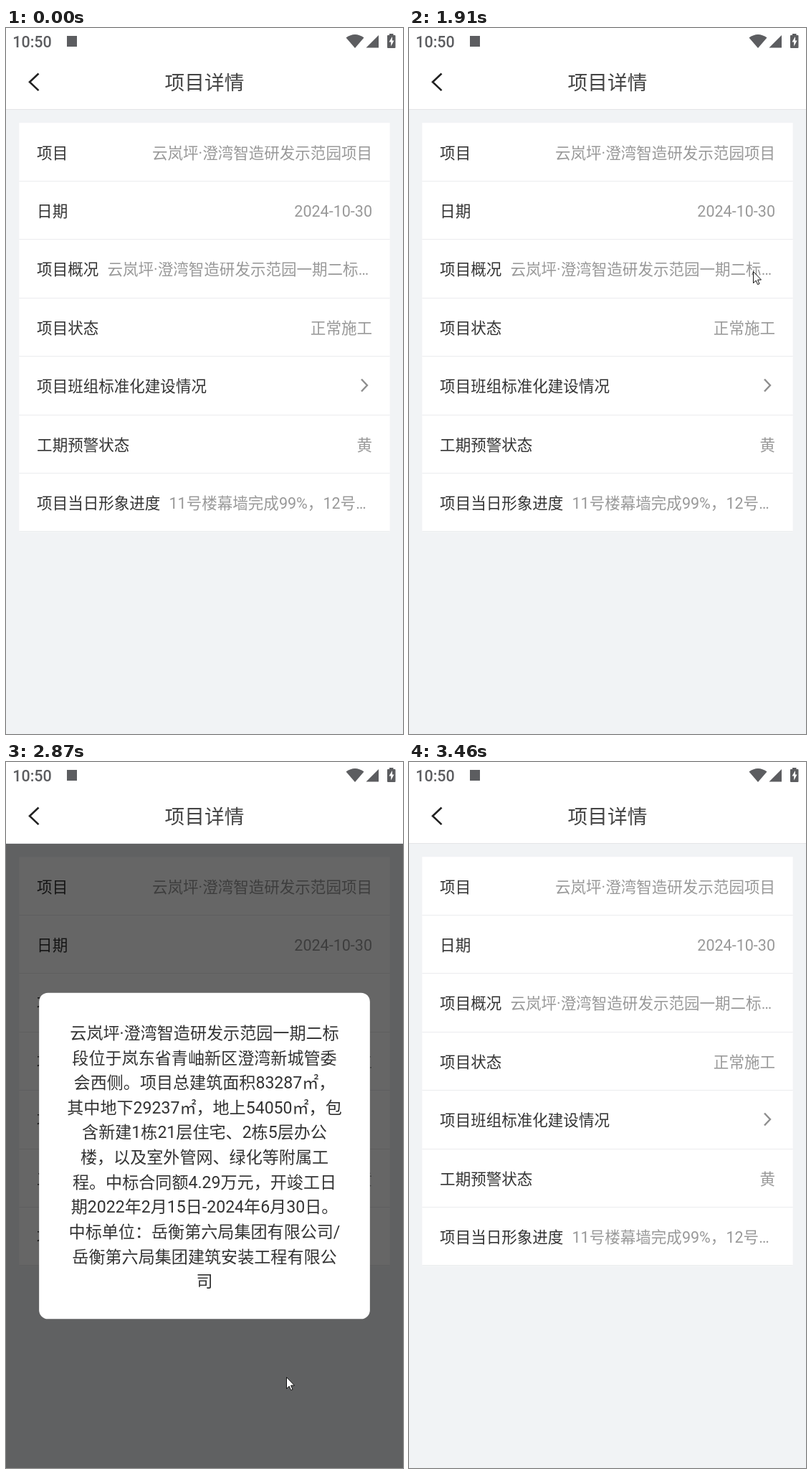
Write an HTML page that moves like this. It is 554 by 984 pixels and loops after 4050 ms.

```html
<!DOCTYPE html>
<html lang="zh-CN">
<head>
<meta charset="utf-8">
<title>项目详情</title>
<style>
html, body { margin: 0; width: 100%; height: 100%; overflow: hidden; background: #f1f3f5; }
svg { display: block; width: 100%; height: 100%; }
text { font-family: Roboto, "Noto Sans CJK SC", "Noto Sans CJK", sans-serif; white-space: pre; }
#rows { font-size: 21.54px; }
.label { fill: #333; }
.value { fill: #999; }
#dialog text { font-size: 23.08px; fill: #333; text-anchor: middle; }
</style>
</head>
<body>
<svg viewBox="0 0 554 984">
  <rect width="554" height="984" fill="#f1f3f5"/>
  <rect x="18.4" y="132.2" width="517.2" height="570" fill="#fff"/>
  <g id="rows"></g>
  <path d="M496 489.5l8 8.5-8 8.5" fill="none" stroke="#8e8e8e" stroke-width="2.4"/>
  <rect id="mask" y="114" width="554" height="870" opacity="0"/>

  <rect width="554" height="113" fill="#fff"/>
  <rect y="113" width="554" height="1" fill="#e4e5e7"/>
  <path d="M45.5 63.5L33 75.3l12.5 11.8" fill="none" stroke="#222" stroke-width="2.6"/>
  <text x="277" y="86.3" font-size="27.7" text-anchor="middle" fill="#444">项目详情</text>

  <g fill="#5c5d60">
    <text x="9.2" y="27" font-size="21.5" font-weight="500">10:50</text>
    <rect x="85" y="11" width="14" height="15"/>
    <path d="M474.5 13.5Q487 4.5 499.5 13.5L487 28z"/>
    <path d="M520 10V27.5H502.5z"/>
    <path d="M535 10v-2h5.5v2h2q1 0 1 1v16q0 1-1 1h-9.5q-1 0-1-1v-16q0-1 1-1z"/>
    <path d="M539 12l-4.5 7.5h2.7v6l4.3-8h-2.5z" fill="#fff"/>
  </g>

  <g id="dialog" opacity="0">
    <rect x="46.15" y="321.7" width="461.7" height="454.6" rx="12.3" fill="#fff"/>
  </g>
  <path id="cursor" d="M.5.5V16.5L4.2 13 6.6 18.5 9 17.5 6.600 12H11.5z"
    fill="#fff" stroke="#111" stroke-linejoin="round" visibility="hidden"/>
</svg>
<script>
const $ = id => document.getElementById(id);

function add(parent, tag, attrs, text = '') {
  const el = document.createElementNS('http://www.w3.org/2000/svg', tag);
  for (const k in attrs) el.setAttribute(k, attrs[k]);
  el.textContent = text;
  parent.append(el);
}

const park = '云岚坪·澄湾智造研发示范园';

// label, value, left edge of the value (right aligned when missing)
const rows = [
  ['项目', park + '项目'],
  ['日期', '2024-10-30'],
  ['项目概况', park + '一期二标…', 141.5],
  ['项目状态', '正常施工'],
  ['项目班组标准化建设情况', ''],
  ['工期预警状态', '黄'],
  ['项目当日形象进度', '11号楼幕墙完成99%，12号…', 227.5]
];
rows.forEach(([label, value, left], i) => {
  const y = 181.5 + 81.4 * i;
  add($('rows'), 'text', { x: 43.1, y, class: 'label' }, label);
  add($('rows'), 'text', {
    x: left || 511, y, class: 'value',
    'text-anchor': left ? 'start' : 'end'
  }, value);
  add($('rows'), 'rect', { x: 18.4, y: Math.round(213 + 81.4 * i), width: 517.2, height: 1, fill: '#ebecee' });
});

const lines = [
  park + '一期二标',
  '段位于岚东省青岫新区澄湾新城管委',
  '会西侧。项目总建筑面积83287㎡，',
  '其中地下29237㎡，地上54050㎡，包',
  '含新建1栋21层住宅、2栋5层办公',
  '楼，以及室外管网、绿化等附属工',
  '程。中标合同额4.29万元，开竣工日',
  '期2022年2月15日-2024年6月30日。',
  '中标单位：岳衡第六局集团有限公司/',
  '岳衡第六局集团建筑安装工程有限公',
  '司'
];
lines.forEach((s, i) => add($('dialog'), 'text', { x: 277, y: 386 + 34.62 * i }, s));

// time, x, y of the pointer tip
const path = [
  [840, 511, 632], [1270, 268, 505], [1350, 276, 496], [1830, 488, 350], [1910, 480, 339],
  [2150, 480, 339], [2330, 464.5, 392.5], [2660, 412, 814], [2870, 391, 857], [3230, 391, 857]
];

function pointer(t) {
  const i = path.findIndex(p => t < p[0]);
  if (i < 1) return null;
  const [a, b] = [path[i - 1], path[i]];
  const u = (t - a[0]) / (b[0] - a[0]);
  const e = u * u * (3 - 2 * u);
  return [a[1] + (b[1] - a[1]) * e, a[2] + (b[2] - a[2]) * e];
}

const easeOut = u => 1 - Math.pow(1 - Math.min(1, Math.max(0, u)), 1.5);

function shown(t) {
  if (t < 2150 || t >= 3460) return 0;
  return t < 3228 ? easeOut((t - 2130) / 250) : 1 - easeOut((t - 3228) / 250);
}

function draw(t) {
  const p = shown(t), scale = 1.15 - 0.15 * p;
  $('mask').setAttribute('opacity', 0.6 * Math.min(1, p * 1.06));
  $('dialog').setAttribute('opacity', p);
  $('dialog').setAttribute('transform', `translate(277 549) scale(${scale}) translate(-277 -549)`);
  const tip = pointer(t);
  $('cursor').setAttribute('visibility', tip ? 'visible' : 'hidden');
  if (tip) $('cursor').setAttribute('transform', `translate(${tip})`);
}

const start = performance.now();
function tick() {
  draw((performance.now() - start) % 4050);
  requestAnimationFrame(tick);
}
tick();
</script>
</body>
</html>
```
